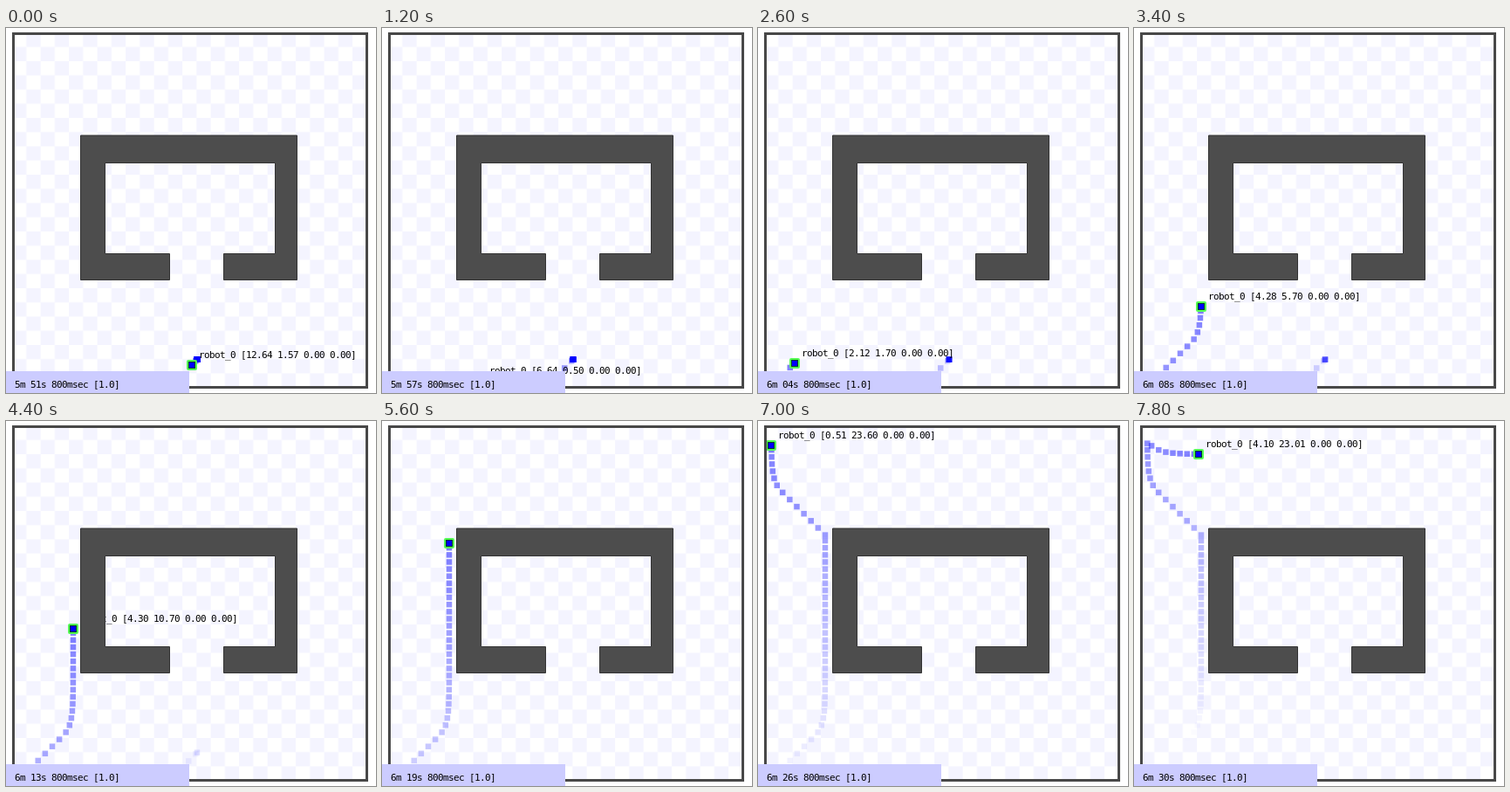
Write an HTML page that moves like this. It is 424 by 418 pixels and loops after 8000 ms.

```html
<!DOCTYPE html>
<html>
<head>
<meta charset="utf-8">
<style>
html, body { margin: 0; width: 100%; height: 100%; overflow: hidden; background: #fff; }
svg { display: block; width: 424px; height: 418px; }
text { font: 11px "DejaVu Sans Mono", "Liberation Mono", monospace; letter-spacing: -0.62px; white-space: pre; fill: #000; }
</style>
</head>
<body>
<svg viewBox="0 0 424 418">
  <defs>
    <pattern id="checker" x="7.1" y="5.45" width="32.5" height="32.5" patternUnits="userSpaceOnUse">
      <path d="M16.25 0h16.25v16.25h-16.25zM0 16.25h16.25v16.25H0z" fill="#f4f4ff"/>
    </pattern>
  </defs>
  <rect width="424" height="418" fill="#fff"/>
  <rect x="8.5" y="6.5" width="405" height="405" fill="url(#checker)"/>
  <g id="trail" fill="#00f"></g>
  <g id="robot">
    <rect x="-5" y="-5" width="10" height="10" rx="1" fill="#00f" stroke="#5f5" stroke-width="2"/>
    <rect x="-3.5" y="-3.5" width="7" height="7" fill="#00f" stroke="#003c28"/>
  </g>
  <text id="label"></text>
  <rect x="8.5" y="6.5" width="405" height="405" fill="none" stroke="#484848" stroke-width="3"/>
  <path d="M85.5 123H333.5V288.5H249.5V258.5H308.5V154.5H113.5V258.5H187.5V288.5H85.5Z" fill="#4d4d4d" stroke="#333"/>
  <rect y="393" width="210" height="25" fill="#ccf"/>
  <text id="clock" x="10" y="411.5"></text>
</svg>
<script>
const STEP = 200, STEPS = 40, SCALE = 16.25, GAIN = 1.3, LIFE = 250, MARKS = 50;
const $ = id => document.getElementById(id);
const px = x => 7.1 + SCALE * x;
const py = y => 411.7 - SCALE * y;

// Legs of the drive: end time in tenths of a second, goal x, goal y
const legs = [[118, 0.5, 0.5], [287, 4.3, 17.7], [354, 0.5, 24.25], [400, 24, 23]];
const START = -4;
const path = [[13.04, 1.97]];
const speed = err => Math.max(-1, Math.min(1, GAIN * err));

for (let i = START; i < 400; i++) {
  const [x, y] = path[path.length - 1];
  const [, gx, gy] = legs.find(leg => i < leg[0]);
  path.push([x + speed(gx - x) / 10, y + speed(gy - y) / 10]);
}
const poseAt = tenth => path[Math.max(0, tenth - START)];

const marks = Array.from({ length: MARKS }, () => {
  const r = document.createElementNS("http://www.w3.org/2000/svg", "rect");
  r.setAttribute("width", 6.5);
  r.setAttribute("height", 6.5);
  return $("trail").appendChild(r);
});

function draw(step) {
  const now = step * 10;
  marks.forEach((mark, j) => {
    const age = 3 + 5 * j;
    const [x, y] = poseAt(now - age);
    mark.setAttribute("x", px(x) - 3.25);
    mark.setAttribute("y", py(y) - 3.25);
    mark.setAttribute("opacity", 0.5 * (1 - age / LIFE));
  });

  const [x, y] = poseAt(now);
  const cx = Math.round(px(x)), cy = Math.round(py(y));
  $("robot").setAttribute("transform", `translate(${cx} ${cy})`);
  $("label").setAttribute("x", cx + 8);
  $("label").setAttribute("y", cy - 8);
  $("label").textContent = `robot_0 [${x.toFixed(2)} ${y.toFixed(2)} 0.00 0.00]`;

  const sec = 351 + step;
  $("clock").textContent =
    `${Math.floor(sec / 60)}m ${String(sec % 60).padStart(2, "0")}s 800msec [1.0]`;
}

const origin = performance.now();
function tick() {
  draw(Math.floor((performance.now() - origin) / STEP) % STEPS);
  requestAnimationFrame(tick);
}
tick();
</script>
</body>
</html>
```
